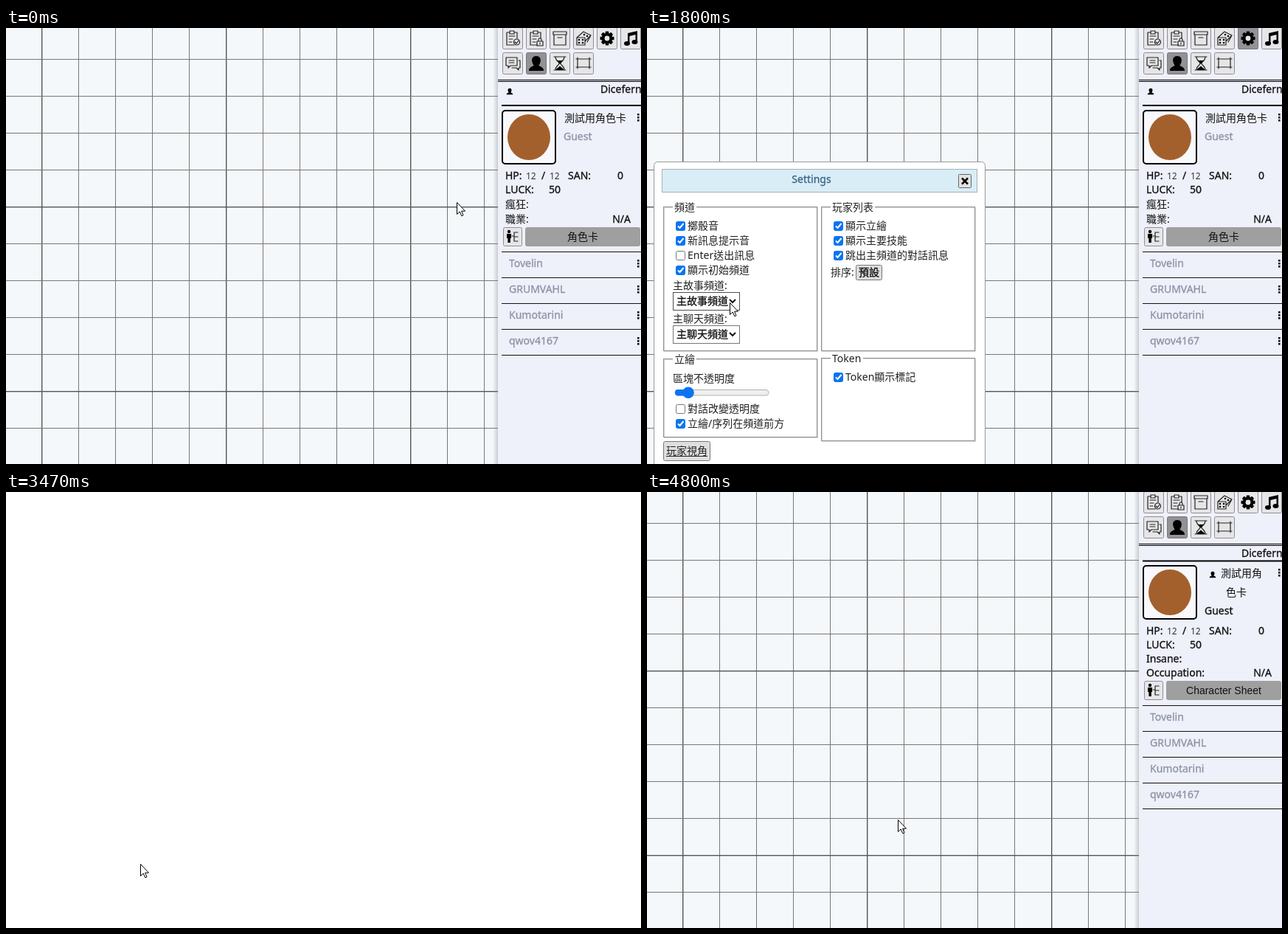
Write an HTML page that moves like this. It is 861 px wide and 591 px high and loops after 4.87 s.

```html
<!DOCTYPE html>
<html lang="zh-Hant">
<head>
<meta charset="utf-8">
<style>
html, body { margin: 0; width: 100%; height: 100%; overflow: hidden; background: #fff; }
svg { display: block; }
text { font: 14px "Noto Sans", "Noto Sans CJK TC", "Noto Sans CJK", sans-serif; white-space: pre; }
.mid { stroke-width: .3; }
.arial { font-family: "Liberation Sans", Arial, sans-serif; }
.line { fill: none; stroke: #222; stroke-width: 1.2; stroke-linejoin: round; stroke-linecap: round; }
</style>
</head>
<body>
<svg id="stage" width="861" height="591" viewBox="0 0 861 591"></svg>
<script>
const FPS = 15, LOOP = 4870;
const INK = '#111', GREY = '#8d93a2', BLUE = '#0a74f0';

const rect = (x, y, w, h, fill, more = '') =>
  `<rect x="${x}" y="${y}" width="${w}" height="${h}" fill="${fill}" ${more}/>`;
const box = (x, y, w, h, fill, stroke, r = 0) =>
  rect(x + .5, y + .5, w - 1, h - 1, fill, `stroke="${stroke}" rx="${r}"`);
const text = (x, y, s, fill = '#222', more = '') =>
  `<text x="${x}" y="${y}" fill="${fill}" ${more}>${s}</text>`;
const mid = (x, y, s, fill = INK, more = '') =>
  text(x, y, s, fill, `class="mid" stroke="${fill}" ${more}`);
const at = (x, y, s, k = 1) => `<g transform="translate(${x} ${y}) scale(${k})">${s}</g>`;
const line = d => `<path class="line" d="${d}"/>`;
const solid = (d, fill = '#000') => `<path d="${d}" fill="${fill}"/>`;
const dot = (x, y, r, fill = '#000') => `<circle cx="${x}" cy="${y}" r="${r}" fill="${fill}"/>`;
const group = (id, s) => `<g id="${id}">${s}</g>`;

// Icons sit in a 28 px button, centred on 0,0
const clip = 'M2 9H-8V-8H-5M3-8H6V0M-4-10H2V-6H-4ZM-5-3H3M-5 1H0M-5 5H-1';
const person = solid('M0-9C4-9 6-6 5-2C4.500 0 4 1 3 2.500C4 4 9 4 9 9H-9C-9 4-4 4-3 2.500C-4 1-4.500 0-5-2C-6-6-4-9 0-9Z');
const teeth = [0, 45, 90, 135].map(a =>
  `<rect x="-2.300" y="-9.500" width="4.600" height="19" rx="1" transform="rotate(${a})"/>`).join('');
const icons = {
  check: line(clip) + line('M3 5L5 7L8 3') + '<circle class="line" cx="5.500" cy="5" r="4"/>',
  lock: line(clip) + line('M1 4H9V10H1ZM3 4V2C3-1 7-1 7 2V4M5 6V8'),
  crate: line('M-9-9H9V-5H-9ZM-8-5V9H8V-5M-3-1H3'),
  dice: line('M-9-1H2V9H-9ZM-9-1L0-9L10-4L2 4M10-4L5 5') +
    [[-6, 2], [-1, 2], [-6, 6], [-1, 6], [1, -5], [5, -3]].map(p => dot(...p, 1.3)).join(''),
  gear: teeth + dot(0, 0, 7.3) + dot(0, 0, 3.4, '#e6e6e8'),
  note: solid('M-4-7L9-10V5H6.500V-5L-1.500-3V7H-4Z') +
    '<ellipse cx="-5" cy="7" rx="4" ry="3"/><ellipse cx="5.500" cy="5" rx="4" ry="3"/>',
  chat: line('M-9-8H6V3H-3L-6 6V3H-9ZM8-4H10V6H8V9L5 6H-1M-5-4H2M-5-1H2'),
  person: at(0, 0, person, 1.12),
  glass: line('M-8-9H8M-8 9H8M-6-9C-6-3-1-3-1 0C-1 3-6 3-6 9M6-9C6-3 1-3 1 0C1 3 6 3 6 9') +
    solid('M-4-4H4L0 1ZM-5 9C-5 6 0 5 0 3C0 5 5 6 5 9Z'),
  frame: line('M-8-6H8V5H-8ZM-10-6H-8V-8M8-8V-6H10M-10 5H-8V7M8 7V5H10')
};

const button = (x, y, name, on) =>
  box(x, y, 28, 30, on ? '#929296' : '#e6e6e8', on ? '#777' : '#8e8e92', 2) +
  at(x + 14, y + 15, icons[name]);

const kebab = y => [-4, 0, 4].map(d => rect(856, y + d - 1, 2.6, 2.6, '#111')).join('');

function board() {
  let s = rect(0, 0, 861, 591, '#f4f8fb');
  for (let i = 0; i < 13; i++) {
    const major = i % 5 === 0;
    s += rect(48 + 50 * i, 0, major ? 1.4 : 1, 591, major ? '#555' : '#777');
  }
  for (let i = 0; i < 11; i++) {
    const major = i % 5 === 4;
    s += rect(0, 42 + 50 * i, 667, major ? 1.4 : 1, major ? '#555' : '#777');
  }
  return s;
}

function sidebar() {
  let s = rect(660, 0, 7, 591, 'url(#shade)') + rect(667, 0, 194, 591, '#eef0fa');
  ['check', 'lock', 'crate', 'dice', 'gear', 'note'].forEach((n, i) => s += button(673 + 32 * i, -1, n));
  ['chat', 'person', 'glass', 'frame'].forEach((n, i) => s += button(673 + 32 * i, 33, n, i === 1));
  return s + rect(667, 70, 194, 1, '#000') + rect(667, 72, 194, 1, '#000') + mid(806, 88, 'Dicefern');
}

const portrait = y => rect(673, y + 1, 72, 72, '#f8f8fd', 'stroke="#000" stroke-width="2" rx="4"') +
  `<ellipse cx="709" cy="${y + 37}" rx="29" ry="31" fill="#a4602c"/>`;

const stats = y => mid(677, y, 'HP:') +
  text(705, y, '12', '#333', 'style="font-size:12px"') + mid(726, y, '/') +
  text(737, y, '12', '#333', 'style="font-size:12px"') +
  mid(762, y, 'SAN:') + mid(829, y, '0') + mid(677, y + 19, 'LUCK:') + mid(736, y + 19, '50');

const sheet = (y, label, cls) => box(674, y, 26, 26, '#e6e6e8', '#8e8e92', 2) +
  dot(682, y + 6, 2.2) + rect(679, y + 9, 6, 6, '#000') + rect(680.4, y + 14, 3.4, 7, '#000') +
  line(`M686 ${y + 12}H689M694 ${y + 7}H689V${y + 19}H694M689 ${y + 13}H694`) +
  rect(704, y, 156, 26, '#9f9f9f', 'rx="3"') +
  text(782, y + 18, label, '#111', `text-anchor="middle" class="${cls}"`);

function players(y, menu) {
  let s = rect(672, y, 189, 1, '#111');
  ['Tovelin', 'GRUMVAHL', 'Kumotarini', 'qwov4167'].forEach((name, i) => {
    const top = y + 35 * i;
    s += mid(682, top + 21, name, GREY) + rect(672, top + 35, 189, 1, '#111');
    if (menu) s += kebab(top + 16);
  });
  return s;
}

const chinese = at(683, 86, person, .48) + rect(672, 104, 189, 2, '#000') + portrait(111) +
  text(757, 127, '測試用角色卡', INK) + kebab(121) + mid(756, 152, 'Guest', GREY) + stats(205) +
  text(677, 244, '瘋狂:', INK) + text(677, 264, '職業:', INK) +
  mid(847, 264, 'N/A', INK, 'text-anchor="end"') + sheet(270, '角色卡', '') + players(303, true);

const english = rect(672, 92.5, 189, 2, '#000') + portrait(99) + at(767, 112, person, .48) +
  text(778, 115, '測試用角', INK) + text(785, 141, '色卡', INK) + kebab(109) +
  mid(756, 166, 'Guest') + stats(193) + mid(677, 231, 'Insane:') + mid(677, 250, 'Occupation:') +
  mid(847, 250, 'N/A', INK, 'text-anchor="end"') + sheet(256, 'Character Sheet', 'arial') + players(289);

const tick = (x, y, label, on = true) =>
  rect(x + .5, y - 5.5, 12, 12, on ? BLUE : '#fff', `rx="2" stroke="${on ? BLUE : '#767676'}"`) +
  (on ? `<path d="M${x + 3} ${y + .5}l2.500 2.500l5-6" fill="none" stroke="#fff" stroke-width="2"/>` : '') +
  text(x + 16, y + 5, label);

const fieldset = (x, y, w, h, title, tw) => box(x + 1, y + 1, w - 1, h - 1, 'none', '#d8d8d8') +
  box(x, y, w - 1, h - 1, 'none', '#909090') +
  rect(x + 13, y - 2, tw + 4, 6, '#fff') + text(x + 15, y + 6, title);

const select = (y, label, id) =>
  rect(35.5, y + .5, 90, 24, '#fff', `id="${id}" stroke="#767676"`) + mid(40, y + 17, label) +
  `<path d="M112 ${y + 10}l4 4l4-4" fill="none" stroke="#111" stroke-width="2"/>`;

const settings =
  box(9, 181, 450, 430, '#fff', '#999', 5) + box(20, 191, 428, 32, '#d9edf7', '#a3b1b9') +
  mid(223, 210, 'Settings', '#3a6585', 'text-anchor="middle"') +
  box(422, 198, 18, 19, '#e2e2e2', '#666', 1) +
  '<path d="M427 203.500l8 8m0-8l-8 8" stroke="#000" stroke-width="2.500"/>' +
  fieldset(22, 242, 210, 197, '頻道', 28) + fieldset(236, 242, 210, 197, '玩家列表', 56) +
  fieldset(22, 448, 210, 108, '立繪', 28) + fieldset(236, 447, 210, 114, 'Token', 40) +
  tick(39, 268, '擲骰音') + tick(39, 288, '新訊息提示音') +
  tick(39, 308, 'Enter送出訊息', false) + tick(39, 328, '顯示初始頻道') +
  text(35, 354, '主故事頻道:') + select(358, '主故事頻道', 'story') +
  text(35, 399, '主聊天頻道:') + select(403, '主聊天頻道', 'talk') +
  tick(253, 268, '顯示立繪') + tick(253, 288, '顯示主要技能') + tick(253, 308, '跳出主頻道的對話訊息') +
  text(249, 336, '排序:') + box(283, 321, 36, 21, '#dedede', '#777', 2) + mid(287, 336, '預設') +
  text(35, 480, '區塊不透明度') +
  rect(38, 490.5, 127, 7.5, '#efefef', 'rx="4" stroke="#b2b2b2"') +
  rect(38, 490, 20, 8.5, BLUE, 'rx="4"') + dot(56, 494.3, 7.8, BLUE) +
  tick(39, 516, '對話改變透明度', false) + tick(39, 536, '立繪/序列在頻道前方') +
  tick(253, 473, 'Token顯示標記') +
  rect(22.5, 560.5, 63, 26, '#dfdfdf', 'id="view" rx="2" stroke="#777"') +
  text(26, 578, '玩家視角') + rect(26, 580, 56, 1, '#222');

const pointer = '<path id="arrow" d="M.5.5V16.500L4.200 13L6.800 18.800L9 17.800L6.600 12.200H11.500Z" fill="#fff" stroke="#000"/>' +
  '<path id="hand" d="M3.500 12V2C3.500-.200 6.500-.200 6.500 2V7L13 9Q15 9.500 15 12V16L13 21H4L-1 13Q-1 10 1.500 11Z" fill="#fff" stroke="#000"/>';

const $ = id => document.getElementById(id);
$('stage').innerHTML =
  '<defs><linearGradient id="shade"><stop stop-color="#999" stop-opacity="0"/>' +
  '<stop offset="1" stop-color="#777" stop-opacity=".35"/></linearGradient></defs>' +
  group('page', board() + sidebar() + group('gear', button(801, -1, 'gear', true)) +
    group('before', chinese) + group('after', english) + group('panel', settings)) +
  group('blank', rect(0, 0, 861, 591, '#fff')) +
  group('dim', rect(0, 0, 861, 591, '#000')) + group('cursor', pointer);

// Cursor path: step, x, y
const path = [
  [1, 611, 236], [9, 821, 26], [10, 820, 22], [12, 797, 14], [14, 812, 17],
  [19, 812, 17], [27, 112, 372], [30, 165, 440], [35, 37, 580], [37, 37, 580],
  [42, 150, 514], [50, 150, 514], [52, 182, 504], [53, 219, 493], [55, 234, 486],
  [60, 234, 486], [65, 239, 477], [67, 255, 471], [68, 255, 471], [72, 340, 444]
];

function locate(n) {
  const i = path.findIndex(k => k[0] >= n);
  if (i < 0) return path[path.length - 1].slice(1);
  if (i === 0) return path[0].slice(1);
  const [a, x0, y0] = path[i - 1], [b, x1, y1] = path[i];
  const u = (n - a) / (b - a), e = u * u * (3 - 2 * u);
  return [Math.round(x0 + (x1 - x0) * e), Math.round(y0 + (y1 - y0) * e)];
}

const show = (id, on) => $(id).style.display = on ? '' : 'none';
const inside = (x, y, l, t, r, b) => x >= l && x < r && y >= t && y < b;

function draw(n) {
  const [x, y] = locate(n);
  const first = n < 38, loaded = n >= 61;
  const link = first && inside(x, y, 22, 560, 86, 587);
  show('page', first || loaded);
  show('before', first);
  show('after', loaded);
  show('panel', first && n >= 16);
  show('gear', first && (n >= 16 || inside(x, y, 801, 0, 829, 29)));
  show('blank', !first && !loaded);
  $('blank').firstChild.setAttribute('fill', n < 53 ? '#fff' : '#f6f8fa');
  $('dim').style.opacity = n < 53 || n > 66 ? 0 : n === 66 ? .25 : .5;
  $('view').setAttribute('fill', link ? '#d0d0d0' : '#dfdfdf');
  $('story').setAttribute('stroke', inside(x, y, 35, 358, 126, 383) ? '#4f4f4f' : '#767676');
  show('arrow', !link);
  show('hand', link);
  $('cursor').setAttribute('transform', `translate(${x} ${y})`);
}

const start = performance.now();
function tickClock() {
  const t = (performance.now() - start) % LOOP;
  draw(Math.min(72, Math.floor((t + 4) * FPS / 1000)));
  requestAnimationFrame(tickClock);
}
draw(0);
tickClock();
</script>
</body>
</html>
```
